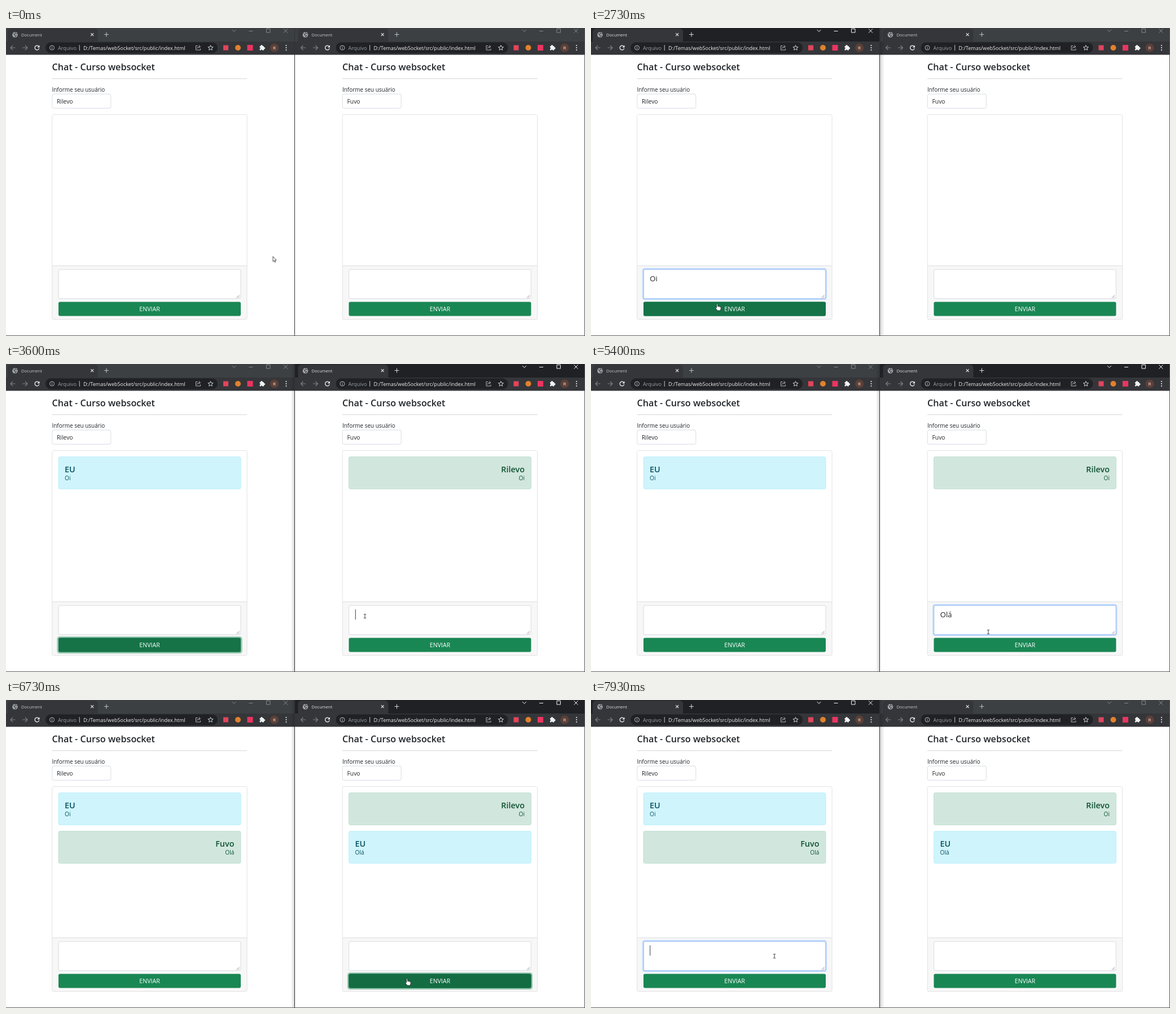
An HTML page with a canvas for the animation above (8 s loop, 1026 by 546 pixels).

```html
<!DOCTYPE html>
<html lang="pt-BR">
<head>
<meta charset="utf-8">
<title>Chat</title>
<style>
html, body { margin: 0; width: 100%; height: 100%; overflow: hidden; background: #fff; }
canvas { display: block; width: 1026px; height: 546px; }
</style>
</head>
<body>
<canvas id="stage" width="1026" height="546"></canvas>
<script>
const ctx = document.getElementById('stage').getContext('2d');
const FAMILY = '"Open Sans", "Noto Sans", sans-serif';
const STEPS = 120;           // 15 steps per second, 8 seconds
const FADE = 2;              // length of a focus transition, in steps
const SHIFT = 514.5;         // distance between the two windows

// All times below are in steps.
const windows = [
  {
    user: 'Rilevo', left: 0, right: 511, shift: 0, active: [[10, 54], [117, 120]],
    field: [[10, 41], [117, 120]], button: [[41, 54]], press: [41, 43],
    caret: [[10, 18], [20, 32], [40, 41], [117, 120]],
    typed: [[20, 'O'], [24, 'Oi'], [43, '']],
    messages: [[43, 'EU', 'Oi', true], [101, 'Fuvo', 'Olá', false]]
  },
  {
    user: 'Fuvo', left: 512, right: 1025, shift: SHIFT, active: [[54, 117]],
    field: [[54, 99]], button: [[99, 117]], press: [99, 101],
    caret: [[54, 62], [64, 78], [86, 94]],
    typed: [[64, 'O'], [65, 'Ol'], [70, 'Olá'], [101, '']],
    messages: [[43, 'Rilevo', 'Oi', false], [101, 'EU', 'Olá', true]]
  }
];

// start, end, then a quadratic curve: from, control, to
const moves = [
  [0, 8, 473, 405, 330, 320, 186, 457],
  [32, 40, 186, 457, 195, 480, 224, 489],
  [44, 52, 224, 489, 420, 475, 636, 447],
  [78, 81, 636, 447, 680, 460, 704, 475],
  [81, 84, 704, 475, 712, 485, 713, 497],
  [84, 87, 713, 497, 712, 495, 711, 494],
  [106, 116, 711, 494, 520, 450, 325, 454]
];

const clamp = v => Math.max(0, Math.min(1, v));
const within = (n, spans) => spans.some(([a, b]) => n >= a && n < b);
const ramp = (n, [a, b]) => clamp((n - a) / FADE) - (b < STEPS ? clamp((n - b) / FADE) : 0);
const level = (n, spans) => Math.max(...spans.map(s => ramp(n, s)));

function pointer(n) {
  const move = moves.filter(m => m[0] <= n).pop() || moves[0];
  const [start, end, x0, y0, cx, cy, x1, y1] = move;
  const p = clamp((n - start) / (end - start));
  const s = p * p * (3 - 2 * p), r = 1 - s;
  return [r * r * x0 + 2 * r * s * cx + s * s * x1, r * r * y0 + 2 * r * s * cy + s * s * y1];
}

function over(n, shift, top, bottom) {
  const [x, y] = pointer(n);
  return x >= 93 + shift && x <= 416 + shift && y >= top && y <= bottom;
}
const overButton = (n, shift) => over(n, shift, 485, 511);
const overField = (n, shift) => over(n, shift, 428, 480);

function rect(x, y, w, h, fill) {
  ctx.fillStyle = fill;
  ctx.fillRect(x, y, w, h);
}

function box(x, y, w, h, radius, fill, stroke, width = 1) {
  ctx.beginPath();
  ctx.roundRect(x, y, w, h, radius);
  if (fill) { ctx.fillStyle = fill; ctx.fill(); }
  if (stroke) { ctx.strokeStyle = stroke; ctx.lineWidth = width; ctx.stroke(); }
}

function disc(x, y, r, fill) {
  ctx.beginPath();
  ctx.arc(x, y, r, 0, Math.PI * 2);
  ctx.fillStyle = fill;
  ctx.fill();
}

function ring(x, y, r, stroke, width = 1, from = 0, to = Math.PI * 2) {
  ctx.beginPath();
  ctx.arc(x, y, r, from, to);
  ctx.strokeStyle = stroke;
  ctx.lineWidth = width;
  ctx.stroke();
}

function path(d, stroke, width = 1, fill) {
  const p = new Path2D(d);
  if (fill) { ctx.fillStyle = fill; ctx.fill(p); }
  if (stroke) { ctx.strokeStyle = stroke; ctx.lineWidth = width; ctx.stroke(p); }
}

function text(str, x, y, size, color, { weight = 400, align = 'left' } = {}) {
  ctx.font = `${weight} ${size}px ${FAMILY}`;
  ctx.textAlign = align;
  ctx.fillStyle = color;
  ctx.fillText(str, x, y);
}

function withAlpha(alpha, draw) {
  if (alpha <= 0) return;
  ctx.save();
  ctx.globalAlpha = alpha;
  draw();
  ctx.restore();
}

function drawTab(active) {
  box(3, 1, 160, 30, 6, '#35363a');
  disc(16, 12, 4.8, '#a9adb2');
  path('M12.5 10 L15.5 11 L14.5 13.5 M16 7.8 L17 10 L20 10.5 M16 16 L17 13.5 L19.5 14', '#35363a', 1.2);
  text('Document', 27, 15, 7.55, active ? '#dfe1e5' : '#c4c7cb');
  path('M150.2 9.2 l5 5 m0 -5 l-5 5', '#e8eaed', 1.1);
  path('M174 11.5 h8 M178 7.5 v8', active ? '#d0d3d7' : '#b8bbbf', 1.1);
  path('M400.5 3 l3.5 3.5 l3.5 -3.5 M430.5 5.5 h7 M461.5 1.5 h6.5 v6.5 h-6.5 z M492 1.5 l7 7 m0 -7 l-7 7',
    active ? '#f1f3f4' : '#85888c', 1);
}

function drawToolbar() {
  path('M16.5 35 h-8.5 m4 -4 l-4 4 l4 4 M29.5 35 h8.5 m-4 -4 l4 4 l-4 4', '#808387', 1.1);
  ring(55, 35, 3.9, '#f1f3f4', 1.3, 0.3, Math.PI * 1.75);
  path('M59.5 30.5 v4 h-4 z', null, 0, '#f1f3f4');

  box(70, 25.5, 305, 19, 9.5, '#202124');
  ring(81.5, 35, 4, '#b4b7bb');
  path('M81.5 34.3 v3 M81.5 32.4 v1', '#b4b7bb');
  text('Arquivo', 92, 38.5, 9.15, '#9aa0a6');
  rect(129.7, 30, 1, 10, '#c3c6ca');
  text('D:/Temas/webSocket/src/public/index.html', 137, 38.5, 9.05, '#eef0f2');
  path('M339.5 31.5 h-3 v7.5 h8 v-2.5 M338.5 36.5 q.5 -3.5 5 -3.5 m-2 -2.5 l3 2.5 l-3 2.5', '#c3c6ca', 0.9);

  ctx.beginPath();
  for (let i = 0; i < 10; i++) {
    const a = -Math.PI / 2 + i * Math.PI / 5, r = i % 2 ? 2.1 : 4.8;
    ctx.lineTo(362.5 + r * Math.cos(a), 35.3 + r * Math.sin(a));
  }
  ctx.closePath();
  ctx.strokeStyle = '#d0d3d7';
  ctx.lineWidth = 1;
  ctx.stroke();

  rect(385, 30.5, 9, 9, '#e0455c');
  disc(411, 35, 5, '#e2812b');
  rect(427.5, 30, 10, 10, '#ea3560');
  box(449.5, 32, 7.5, 7.5, 1, '#f1f3f4');
  disc(453, 31.6, 1.7, '#f1f3f4');
  disc(457.4, 35.8, 1.7, '#f1f3f4');
  disc(449.5, 35.8, 1.2, '#35363a');
  disc(453, 39.5, 1.2, '#35363a');
  disc(475.5, 35, 7.6, '#5d4037');
  text('R', 475.5, 38, 8, '#f1e9e6', { align: 'center' });
  for (const y of [31, 35, 39]) disc(496.5, y, 1.1, '#f1f3f4');
}

function drawMessage(row, [, name, body, own]) {
  const y = 164.5 + row * 68;
  const [fill, edge, ink] = own ? ['#cff4fc', '#b6effb', '#055160'] : ['#d1e7dd', '#badbcc', '#0f5132'];
  const x = own ? 104 : 404.5, align = own ? 'left' : 'right';
  box(93, y, 323, 57, 2.7, fill, edge, 0.8);
  text(name, x, y + 27, 14.4, ink, { weight: 600, align });
  text(body, x, y + 41.8, 10.2, ink, { align });
}

function drawField(win, n) {
  const focus = level(n, win.field);
  withAlpha(focus, () => box(90.7, 425.6, 327.2, 56.4, 4.5, '#c2dbfe'));
  box(93.2, 428, 322.6, 51.8, 2.7, '#fff', '#ced4da', 0.8);
  withAlpha(focus, () => box(93.2, 428, 322.6, 51.8, 2.7, null, '#86b7fe', 0.8));
  path('M408.5 478.5 l5 -5 M411.5 478.5 l2 -2', '#777', 0.8);

  const entry = win.typed.filter(([at]) => at <= n).pop();
  const value = entry ? entry[1] : '';
  text(value, 104.2, 449, 13.1, '#212529');
  if (within(n, win.caret)) {
    rect(104.3 + ctx.measureText(value).width, 435, 0.9, 18, '#212529');
  }
}

function drawButton(win, n) {
  const focus = level(n, win.button);
  const hover = (overButton(n, win.shift) + overButton(n - 1, win.shift)) / 2;
  const face = color => box(93, 485.5, 323, 25, 2.7, color);
  withAlpha(focus * 0.5, () => box(90.4, 483, 328.2, 30.2, 4.5, '#3c996e'));
  face('#198754');
  withAlpha(Math.max(focus, hover), () => face('#157347'));
  withAlpha(ramp(n, win.press), () => face('#146c43'));
  text('ENVIAR', 254.5, 502.4, 10.6, '#fff', { align: 'center' });
}

function drawPage(win, n) {
  text('Chat - Curso websocket', 81.5, 75.3, 16.2, '#212529', { weight: 600 });
  rect(81.5, 89.3, 345.5, 1, '#d3d4d5');
  text('Informe seu usuário', 81.5, 113, 9.95, '#212529');
  box(81.8, 117, 104, 25.2, 2.7, '#fff', '#ced4da', 0.8);
  text(win.user, 90, 134, 10.3, '#212529');

  box(81.7, 153.5, 345.4, 363.2, 2.7, '#fff');
  box(81.7, 421.5, 345.4, 95.2, [0, 0, 2.7, 2.7], '#f7f7f7');
  rect(82, 421, 345, 1, '#dfdfdf');
  box(81.7, 153.5, 345.4, 363.2, 2.7, null, '#dfdfdf', 0.9);
  win.messages.forEach((m, row) => { if (n >= m[0]) drawMessage(row, m); });
  drawField(win, n);
  drawButton(win, n);
}

function drawWindow(win, n) {
  const active = within(n, win.active);
  const width = win.right - win.left;
  ctx.save();
  ctx.beginPath();
  ctx.rect(win.left, 0, width, 546);
  ctx.clip();
  rect(win.left, 0, width, 546, '#fff');
  rect(win.left, 0, width, 24, active ? '#202124' : '#3c4043');
  rect(win.left, 24, width, 23.5, '#35363a');
  ctx.translate(win.shift, 0);
  drawTab(active);
  drawToolbar();
  drawPage(win, n);
  ctx.restore();
}

function drawShadow(from, to) {
  const g = ctx.createLinearGradient(from, 0, to, 0);
  g.addColorStop(0, 'rgba(0,0,0,.16)');
  g.addColorStop(1, 'rgba(0,0,0,0)');
  rect(Math.min(from, to), 0, Math.abs(to - from), 545, g);
}

function drawPointer(n) {
  const [x, y] = pointer(n);
  const hits = test => windows.some(win => test(n, win.shift));
  ctx.save();
  ctx.translate(x, y);
  if (hits(overButton)) {
    path('M-1.3 .8 Q-.3 -.8 .7 .8 V4.5 Q2 3.6 2.7 5 Q4 4.2 4.6 5.6 Q6 5.2 6.2 6.6 V8.8 L5 12 H0 L-3.2 7.6 Q-3.2 6 -1.3 7 Z',
      '#222', 0.8, '#fff');
  } else if (hits(overField)) {
    path('M-2 -3.5 H-.5 L0 -3 L.5 -3.5 H2 M0 -3 V3 M-2 3.5 H-.5 L0 3 L.5 3.5 H2', '#222', 0.9);
  } else {
    path('M0 0 V9 L2 7.2 L3.4 10.4 L4.8 9.8 L3.5 6.7 H6.2 Z', '#222', 0.8, '#fff');
  }
  ctx.restore();
}

function draw(n) {
  const [first, second] = windows;
  rect(0, 0, 1026, 546, '#fff');
  drawWindow(first, n);
  drawWindow(second, n);
  if (within(n, first.active)) drawShadow(512, 520);
  if (within(n, second.active)) drawShadow(511, 505);
  rect(511, 0, 1, 546, '#303134');
  rect(1025, 0, 1, 546, '#55575a');
  rect(0, 545, 1026, 1, '#5c5e61');
  drawPointer(n);
}

const began = performance.now();
function tick() {
  const elapsed = performance.now() - began;
  draw(Math.floor((elapsed + 5) * 0.015) % STEPS);
  requestAnimationFrame(tick);
}
tick();
</script>
</body>
</html>
```
